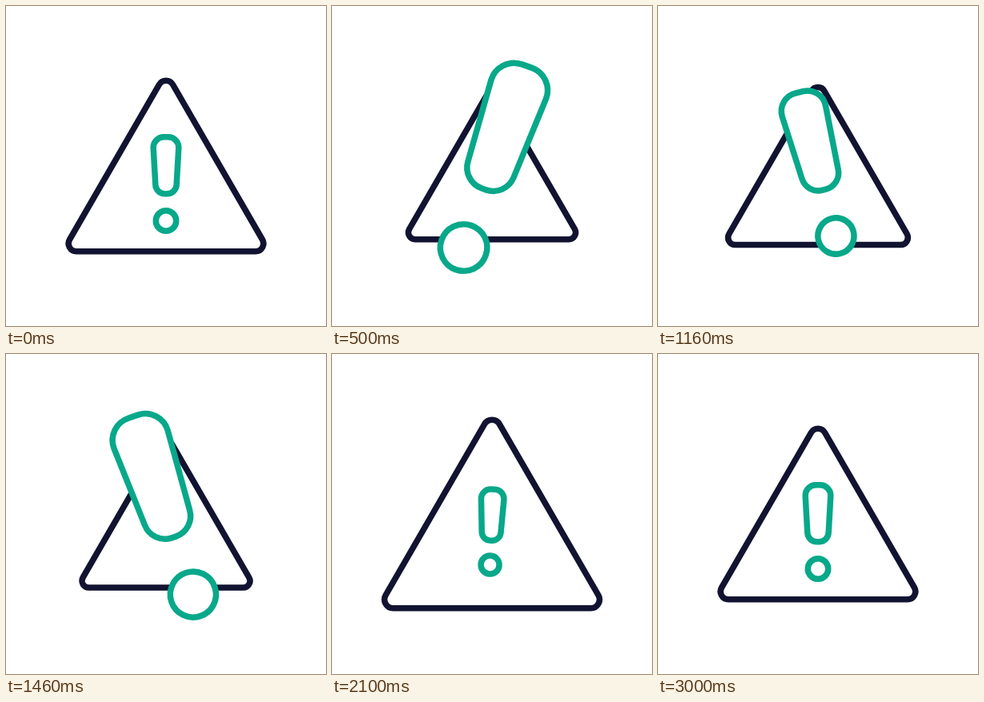
Recreate the animation shown at these times as an HTML page. Size 400 by 400 pixels, loop 3020 ms.

```html
<!DOCTYPE html>
<html lang="en">
<head>
<meta charset="utf-8">
<title>Warning</title>
<style>
  html, body { margin: 0; height: 100%; overflow: hidden; background: #fff; }
  svg { display: block; width: 100%; height: 100%; }
  path, circle { fill: #fff; stroke-width: 7.5; vector-effect: non-scaling-stroke; }
  #triangle { stroke: #121331; }
  #mark { stroke: #08a88a; }
</style>
</head>
<body>
<svg viewBox="0 0 400 400">
  <path id="triangle" d="M88.1 306.8A9.85 9.85 0 0 1 79.5 292L191.5 98.2A9.85 9.85 0 0 1 208.5 98.2L320.5 292A9.85 9.85 0 0 1 311.9 306.8Z"/>
  <g id="mark">
    <path d="M184.2 177.3A13 13 0 0 1 197.2 163.8H202.8A13 13 0 0 1 215.8 177.3L213.2 223.3A12 12 0 0 1 201.2 234.8H198.8A12 12 0 0 1 186.8 223.3Z"/>
    <circle cx="200" cy="268.5" r="12.75"/>
  </g>
</svg>
<script>
const LOOP = 3020;
const triangle = document.getElementById('triangle');
const mark = document.getElementById('mark');

// Easing curve cubic-bezier(a, 0, b, 1)
function ease(u, a, b) {
  let lo = 0, hi = 1, p = 0.5;
  for (let i = 0; i < 24; i++) {
    p = (lo + hi) / 2;
    const q = 1 - p;
    const x = 3 * a * p * q * q + 3 * b * p * p * q + p * p * p;
    if (x < u) lo = p; else hi = p;
  }
  return p * p * (3 - 2 * p);
}

const SOFT = [0.333, 0.667], SWING = [0.35, 0.28], DROP = [0.59, 0.49];

// Keys: [time, values, easing towards the next key]
// Sizes: triangle scale, mark scale, mark shift along its own axis
const sizes = [
  [0, [1, 1, 0], SOFT],
  [400, [0.85, 2.36, -51.5], SOFT],
  [960, [0.945, 1.6, -25], SOFT],
  [1600, [0.85, 2.33, -50.5], DROP],
  [2250, [1.128, 0.76, 7], SOFT],
  [2620, [0.933, 1.17, -11.8], SOFT],
  [3000, [1, 1, 0]]
];
const tilts = [
  [0, [0], SOFT],
  [400, [20], SWING],
  [1600, [-19], DROP],
  [2250, [4.3], SOFT],
  [2620, [-2.5], SOFT],
  [3000, [0]]
];

function sample(keys, t) {
  const next = keys.findIndex(key => key[0] > t);
  if (next < 0) return keys[keys.length - 1][1];
  const [t0, from, curve] = keys[next - 1];
  const [t1, to] = keys[next];
  const k = ease((t - t0) / (t1 - t0), ...curve);
  return from.map((v, i) => v + (to[i] - v) * k);
}

const scale = s => `translate(200 200) scale(${s}) translate(-200 -200)`;

function draw(now) {
  const t = now % LOOP;
  const [outer, inner, shift] = sample(sizes, t);
  const [tilt] = sample(tilts, t);
  triangle.setAttribute('transform', scale(outer));
  mark.setAttribute('transform', `rotate(${tilt} 200 200) translate(0 ${shift}) ${scale(inner)}`);
}

const start = performance.now();
function tick() {
  draw(performance.now() - start);
  requestAnimationFrame(tick);
}
tick();
</script>
</body>
</html>
```
